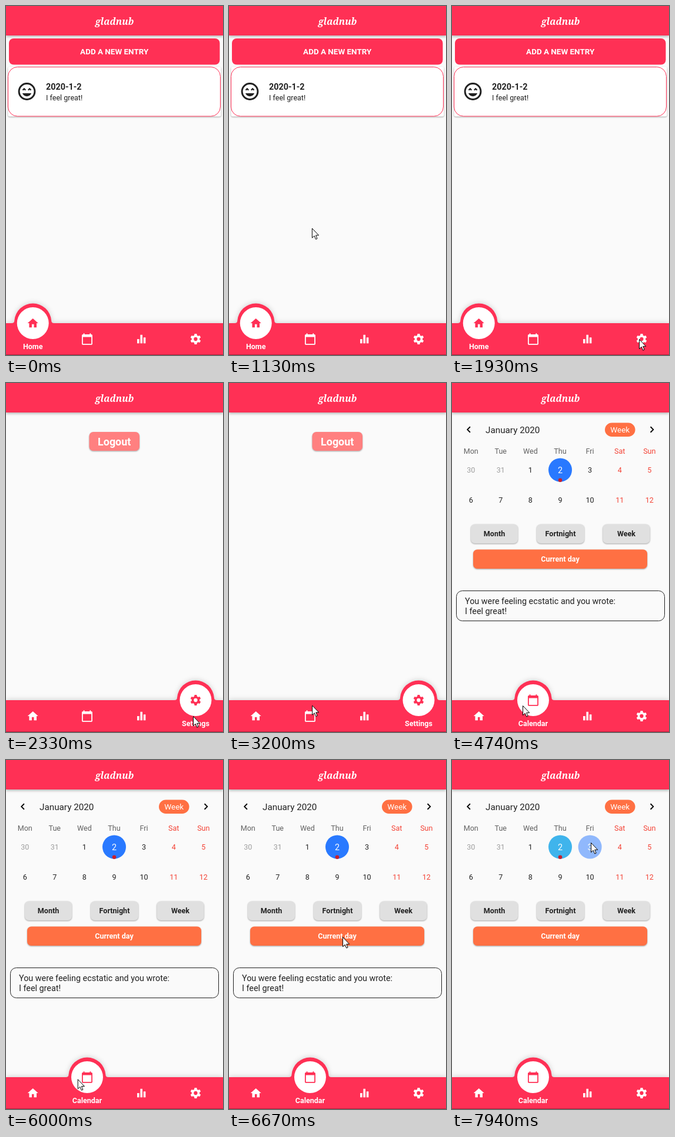
Animation, 369 px wide and 592 px high, one loop 8000 ms. Source, as an HTML page:

```html
<!DOCTYPE html>
<html lang="en">
<head>
<meta charset="utf-8">
<title>Mood diary</title>
<style>
  html, body { margin: 0; width: 100%; height: 100%; overflow: hidden; background: #fafafa; }
  svg { display: block; width: 100%; height: 100%; }
  text { font-family: Roboto, sans-serif; font-size: 12.56px; }
  .raised { filter: drop-shadow(0 1px 1.2px rgba(0, 0, 0, .35)); }
  .header { filter: drop-shadow(0 2px 2px rgba(0, 0, 0, .28)); }
  .bar { filter: drop-shadow(0 -1px 4px rgba(0, 0, 0, .16)); }
  .title { font: italic bold 15.5px "Noto Serif", serif; }
</style>
</head>
<body>
<svg id="stage" viewBox="0 0 369 592"></svg>
<script>
const RED = '#ff3055', ORANGE = '#ff7043', INK = '#212121', ALERT = '#f44336', BLUE = '#2979ff';
const FPS = 15, LOOP = 8000;

// Markup helpers
const text = (x, y, str, { size = 12.56, fill = INK, weight = 400, anchor = 'middle' } = {}) =>
  `<text x="${x}" y="${y}" fill="${fill}" font-weight="${weight}" text-anchor="${anchor}" style="font-size:${size}px">${str}</text>`;
const box = (x, y, w, h, r, fill, extra = '') =>
  `<rect x="${x}" y="${y}" width="${w}" height="${h}" rx="${r}" fill="${fill}" ${extra}/>`;
const button = (x, y, w, h, fill, label, color) =>
  box(x, y, w, h, 7, fill, 'class="raised"') +
  text(x + w / 2, y + h / 2 + 4.6, label, { fill: color, weight: 600 });

// Icons live on a 24-unit grid
const GEAR = '<circle cx="12" cy="12" r="5.5" fill="none" stroke="currentColor" stroke-width="4"/>' +
  [0, 60, 120, 180, 240, 300].map(a =>
    `<path d="M9.9 2h4.2l.8 4.5H9.1z" transform="rotate(${a} 12 12)"/>`).join('');
const ICONS = [
  '<path d="M10 20v-6h4v6h5v-8h3L12 3 2 12h3v8z"/>',
  '<path d="M20 3h-1V1h-2v2H7V1H5v2H4c-1.1 0-2 .9-2 2v16c0 1.1.9 2 2 2h16c1.1 0 2-.9 2-2V5c0-1.1-.9-2-2-2zm0 18H4V8h16z"/>',
  '<path d="M10 20h4V4h-4zM4 20h4v-8H4zM16 9v11h4V9z"/>',
  GEAR
];
const SMILEY = `<circle cx="12" cy="12" r="9" fill="none" stroke="currentColor" stroke-width="2"/>
  <path d="M13 9.94 14.06 11l1.06-1.06L16.18 11l1.06-1.06-2.12-2.12zM8.88 9.94 9.94 11 11 9.94 8.88 7.82 6.76 9.94 7.82 11zM12 17.5c2.33 0 4.31-1.46 5.11-3.5H6.89c.8 2.04 2.78 3.5 5.11 3.5z"/>`;
const icon = (shape, x, y, color, scale = .897) =>
  `<g transform="translate(${x} ${y}) scale(${scale}) translate(-12 -12)" fill="${color}" color="${color}">${shape}</g>`;
const CHEVRON = '<path d="M15.41 7.41 14 6l-6 6 6 6 1.41-1.41L10.83 12z"/>';

const homePage = () =>
  box(5, 55, 358.5, 44.5, 8, RED) +
  text(184.2, 82, 'ADD A NEW ENTRY', { size: 13.45, fill: '#fff', weight: 600 }) +
  box(3.5, 103, 362, 84.5, 3, '#fff', 'class="raised"') +
  box(3.5, 103.5, 361, 83.5, 16, '#fff', `stroke="${RED}"`) +
  icon(SMILEY, 35.5, 145, INK, 1.49) +
  text(68, 142, '2020-1-2', { size: 14.35, weight: 700, anchor: 'start' }) +
  text(68, 160, 'I feel great!', { anchor: 'start' });

const settingsPage = () =>
  box(141.5, 83, 85.5, 32, 7, '#ff8080', 'class="raised"') +
  text(184.2, 105.5, 'Logout', { size: 17.9, fill: '#fff', weight: 700 });

const column = i => 32.2 + 50.6 * i;

function calendarPage() {
  const heads = ['Mon', 'Tue', 'Wed', 'Thu', 'Fri', 'Sat', 'Sun'].map((d, i) =>
    text(column(i), 119.5, d, { fill: i > 4 ? ALERT : '#616161' })).join('');
  const days = Array.from({ length: 14 }, (_, i) => {
    const col = i % 7, x = column(col), y = i < 7 ? 152 : 203;
    if (i === 3) return '';
    const fill = i < 2 ? '#9e9e9e' : col > 4 ? ALERT : INK;
    return text(x, y, i < 2 ? 30 + i : i - 1, { fill }).replace('<text', `<text id="day${i}"`);
  }).join('');
  const disc = (id, col, label) => `<g id="${id}">
    <circle cx="${column(col)}" cy="147.5" r="20" fill="${BLUE}"/>
    ${text(column(col), 152.6, label, { size: 14.35, fill: '#fff' })}</g>`;
  return icon(CHEVRON, 28.5, 79, '#000') +
    `<g transform="rotate(180 340 79)">${icon(CHEVRON, 340, 79, '#000')}</g>` +
    text(57, 84.5, 'January 2020', { size: 15.25, anchor: 'start' }) +
    box(260, 67.5, 51.5, 23.5, 11.75, ORANGE) +
    text(285.7, 84, 'Week', { size: 13.45, fill: '#fff' }) +
    heads + days + disc('today', 3, 2) + disc('picked', 4, 3) +
    `<circle cx="184" cy="164.7" r="3.3" fill="#c8202c"/>` +
    button(32, 239.5, 80, 32.5, '#e0e0e0', 'Month', INK) +
    button(144, 239.5, 81, 32.5, '#e0e0e0', 'Fortnight', INK) +
    button(256.5, 239.5, 80, 32.5, '#e0e0e0', 'Week', INK) +
    button(36, 282.5, 296, 32.5, ORANGE, 'Current day', '#fff') +
    `<g id="note">${box(7.5, 352.5, 354, 51, 10, 'none', `stroke="${INK}"`)}
    ${text(22, 375, 'You were feeling ecstatic and you wrote:', { size: 14.35, anchor: 'start' })}
    ${text(22, 392, 'I feel great!', { size: 14.35, anchor: 'start' })}</g>`;
}

const tabX = i => 45.7 + 92.25 * i;
const LABELS = ['Home', 'Calendar', 'Stats', 'Settings'];

document.getElementById('stage').innerHTML = `
  <rect width="369" height="592" fill="#fafafa"/>
  <g id="page0">${homePage()}</g>
  <g id="page1">${calendarPage()}</g>
  <g id="page3">${settingsPage()}</g>
  <rect class="header" width="369" height="50" fill="${RED}"/>
  <text class="title" x="184.5" y="32" fill="#fff" text-anchor="middle">gladnub</text>
  <g class="bar">
    <rect y="538" width="369" height="54" fill="${RED}"/>
    <path id="arch" fill="${RED}" d="M-36 0Q-31.5 0-31.4-4.5A31.5 31.5 0 0 1 31.4-4.5Q31.5 0 36 0V1H-36z"/>
  </g>
  <rect y="591" width="369" height="1" fill="#000" opacity=".3"/>
  ${ICONS.map((shape, i) => `<g id="tab${i}">${icon(shape, tabX(i), 565, '#fff')}</g>
    <g id="label${i}">${text(tabX(i), 581.6, LABELS[i], { fill: '#fff', weight: 600 })}</g>`).join('')}
  <g id="bubble"><circle r="27" fill="#fff"/>
    ${ICONS.map((shape, i) => `<g id="mark${i}">${icon(shape, 0, 0, RED)}</g>`).join('')}
  </g>
  <path id="cursor" d="M.5.5V16.6L4.2 13.2 6.7 19 9.1 18 6.7 12.3H11.7z" fill="#fff" stroke="#000"/>`;

const el = id => document.getElementById(id);
const setOpacity = (id, v) => el(id).setAttribute('opacity', v);
const move = (id, x, y) => el(id).setAttribute('transform', `translate(${x} ${y})`);
const show = (id, on) => { el(id).style.display = on ? '' : 'none'; };
const clamp = v => Math.max(0, Math.min(1, v));

// Pointer stops: tick, x, y
const STOPS = [
  [9, 365, 575], [15, 81, 323], [21, 312, 530], [24, 313, 570], [26, 313, 570],
  [29, 318, 565], [39, 318, 565], [49, 136, 546], [54, 136, 546], [55, 138, 536],
  [56, 138, 540], [60, 138, 540], [63, 130, 541], [64, 130, 541], [69, 122, 546],
  [70, 122, 546], [71, 120, 547], [89, 120, 547], [100, 193, 300], [107, 193, 300],
  [113, 236, 140], [120, 236, 140]
];

function drawCursor(tick) {
  show('cursor', tick >= STOPS[0][0]);
  const n = STOPS.findIndex(s => s[0] > tick);
  if (n < 1) return;
  const [t0, x0, y0] = STOPS[n - 1], [t1, x1, y1] = STOPS[n];
  const p = (tick - t0) / (t1 - t0), e = p * p * (3 - 2 * p);
  move('cursor', x0 + (x1 - x0) * e, y0 + (y1 - y0) * e);
}

function drawNav(from, to, p) {
  const eased = 1 - (1 - p) ** 2;
  const x = tabX(from) + (tabX(to) - tabX(from)) * eased;
  move('arch', x, 538);
  move('bubble', x, 538);
  ICONS.forEach((_, i) => {
    const selected = i === to ? p : i === from ? 1 - p : 0;
    move('tab' + i, 0, -16 * selected ** 2);
    setOpacity('tab' + i, 1 - selected);
    move('label' + i, 0, 24 * (1 - selected));
    const fade = i === to ? (p - .8) / .2 : i === from ? 1 - p / .2 : 0;
    setOpacity('mark' + i, clamp(fade));
  });
}

function draw(now) {
  const tick = Math.floor((now % LOOP + 4) * FPS / 1000) % (LOOP * FPS / 1000);
  const page = tick < 31 ? 0 : tick < 55 ? 3 : 1;
  [0, 1, 3].forEach(i => show('page' + i, i === page));

  if (tick < 55) drawNav(0, 3, clamp((tick - 30) / 5));
  else drawNav(3, 1, 1);

  const pick = clamp((tick - 116) / 6);
  show('note', !pick);
  show('day4', !pick);
  setOpacity('picked', pick);
  el('today').firstElementChild.setAttribute('fill', pick ? '#3fb4ec' : BLUE);

  drawCursor(tick);
  requestAnimationFrame(draw);
}
draw(performance.now());
</script>
</body>
</html>
```
